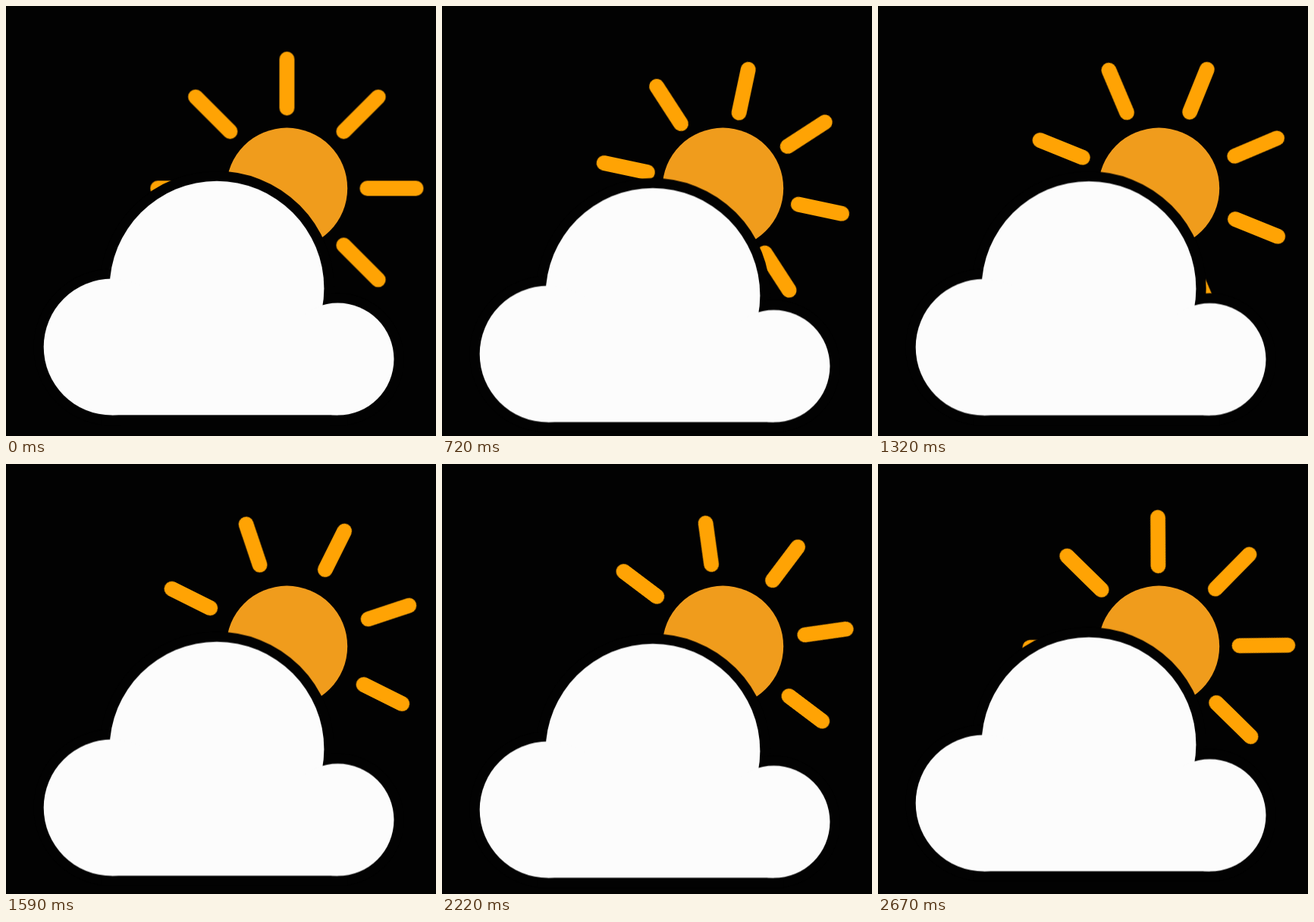
Write an HTML page that moves like this. It is 567x567 px and loops after 2700 ms.

```html
<!DOCTYPE html>
<html lang="en">
<head>
<meta charset="utf-8">
<title>Sun behind a cloud</title>
<style>
  html, body {
    margin: 0;
    width: 100%;
    height: 100%;
    overflow: hidden;
    background: #020202;
  }
  svg { display: block; width: 100%; height: 100%; }

  .disc { fill: #f09c1c; }
  .rays {
    fill: none;
    stroke: #ffa304;
    stroke-width: 19.8;
    stroke-linecap: round;
    animation: spin 2.7s linear infinite, stretch 2.7s linear infinite;
  }
  .cloud { animation: bob 2.7s linear infinite; }
  .rim { fill: #020202; stroke: #020202; stroke-width: 26.5; }
  .body { fill: #fcfcfc; }

  @keyframes spin {
    from { transform: rotate(0deg); }
    to { transform: rotate(45deg); }
  }
  /* dash = ray length, offset = distance from the sun's centre */
  @keyframes stretch {
    0%, 100% { stroke-dasharray: 64.3 300; stroke-dashoffset: -106; }
    20% { stroke-dasharray: 55.8 300; stroke-dashoffset: -100.3; }
    40% { stroke-dasharray: 64.4 300; stroke-dashoffset: -104.3; }
    60% { stroke-dasharray: 56.3 300; stroke-dashoffset: -113.5; }
    80% { stroke-dasharray: 53.8 300; stroke-dashoffset: -109.4; }
  }
  @keyframes bob {
    0%, 50% { transform: translateY(0); }
    25%, 75% { transform: translateY(10px); }
    100% { transform: translateY(-2.9px); }
  }
</style>
</head>
<body>
<svg viewBox="0 0 567 567">
  <defs>
    <g id="shape">
      <circle cx="278" cy="372.2" r="141.4"/>
      <circle cx="139.7" cy="449.6" r="90"/>
      <circle cx="437.5" cy="465.6" r="74"/>
      <rect x="139.7" y="449" width="297.8" height="90.3"/>
    </g>
  </defs>
  <g transform="translate(370.4 240.4)">
    <circle class="disc" r="79.8"/>
    <path class="rays" d="M0 0H200M0 0H-200M0 0V200M0 0V-200M0 0L142 142M0 0L-142 142M0 0L142-142M0 0L-142-142"/>
  </g>
  <g class="cloud">
    <use class="rim" href="#shape"/>
    <use class="body" href="#shape"/>
  </g>
</svg>
</body>
</html>
```
